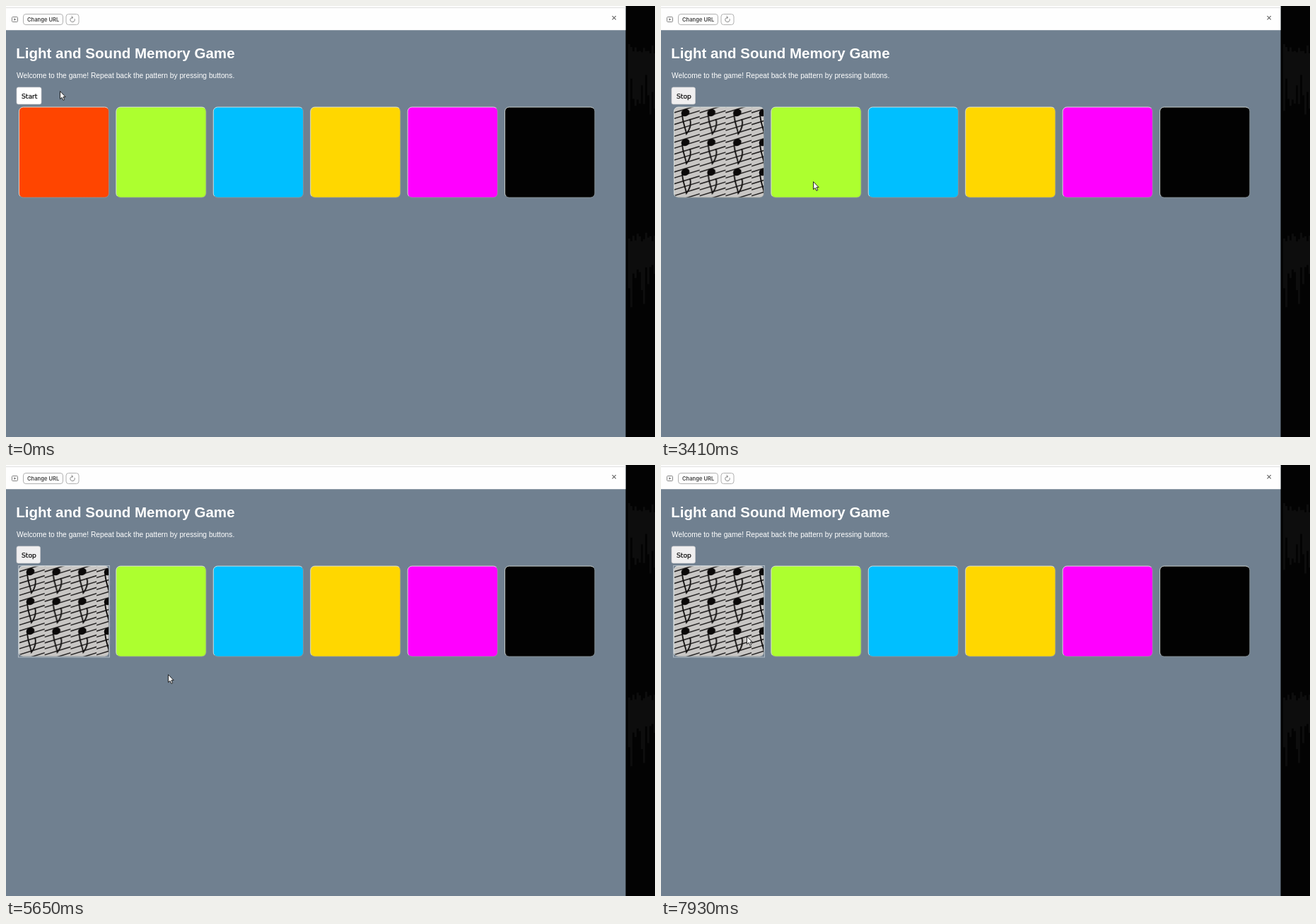
Recreate the animation shown at these times as an HTML page. Size 918 px wide and 610 px high, loop 8 s.

```html
<!DOCTYPE html>
<html lang="en">
<head>
<meta charset="utf-8">
<title>Memory game</title>
<style>
html, body { margin: 0; width: 100%; height: 100%; overflow: hidden; background: #708090; }
svg { display: block; width: 918px; height: 610px; }
.page { font-family: "Liberation Sans", Arial, sans-serif; fill: #fff; }
.button { font: 9.2px "DejaVu Sans", sans-serif; fill: #111; stroke: #111; stroke-width: .25; }
.bar { font: 600 7.6px Inter, sans-serif; fill: #444; }
.icon { fill: none; stroke: #777; stroke-width: .9; }
</style>
</head>
<body>
<svg viewBox="0 0 918 610">
  <defs>
    <linearGradient id="bevel" x2="1" y2="1">
      <stop offset=".5" stop-color="#dde3e0"/>
      <stop offset=".5" stop-color="#8a9499"/>
    </linearGradient>
    <pattern id="notes" x="18" y="143" width="36.7" height="42" patternUnits="userSpaceOnUse">
      <rect width="37" height="42" fill="#c8c6c4"/>
      <g id="staff" stroke="#242222" stroke-width="1.5"></g>
      <path d="M12 9C12 20 16 28 18 38C24 30 25 24 23 17" fill="none" stroke="#0b0909" stroke-width="1.8"/>
      <ellipse cx="16.5" cy="8" rx="6" ry="5" transform="rotate(-25 16.5 8)" fill="#0b0909"/>
    </pattern>
  </defs>
  <rect width="918" height="610" fill="#030303"/>
  <g id="texture"></g>
  <rect width="876.5" height="610" fill="#708090"/>
  <rect width="876.5" height="34.2" fill="#fefefe"/>
  <path d="M0 2.3H876.5" stroke="#ddd"/>

  <g class="icon">
    <rect x="8.5" y="15.5" width="8" height="7" rx="1"/>
    <path d="M11.3 17.2L14.4 19L11.3 20.8Z" fill="#777" stroke="none"/>
    <rect x="24.5" y="11.5" width="56" height="15" rx="3.5" stroke="#aaa"/>
    <rect x="85" y="11.5" width="18" height="15" rx="3.5" stroke="#aaa"/>
    <path d="M97 18.2A3.2 3.2 0 1 1 94 16.2M92.5 14.3L94.8 16.2L92.7 18"/>
    <path d="M857.5 14.2L862.7 19.4M862.7 14.2L857.5 19.4" stroke="#666" stroke-width="1.2"/>
  </g>
  <text class="bar" x="30" y="22">Change URL</text>

  <g class="page">
    <text x="14.2" y="74" font-size="20.55" font-weight="bold">Light and Sound Memory Game</text>
    <text x="15" y="102" font-size="10.22">Welcome to the game! Repeat back the pattern by pressing buttons.</text>
  </g>
  <rect id="box" x="15" y="115" height="24" rx="2.5" stroke="#c9c9cc" stroke-width=".7"/>
  <text class="button" id="label" x="22" y="130.6"></text>

  <g id="tiles" stroke="url(#bevel)" stroke-width=".9"></g>
  <rect id="focus" x="17.5" y="142.5" width="129" height="129.5" fill="none" stroke="#dde2e6" stroke-opacity=".6"/>
  <path id="cursor" d="M.5 .7V11.7L3 9.4L4.9 13.4L6.7 12.6L4.9 8.7H8.2Z" fill="#fff" stroke="#111" stroke-width=".9"/>
</svg>
<script>
const $ = id => document.getElementById(id);
const LOOP = 8000, STEP = 140.6;
const colors = ['#ff4500', '#adff2f', '#00bfff', '#ffd700', '#ff00ff', '#020202'];

function add(parent, tag, attrs) {
  const node = document.createElementNS('http://www.w3.org/2000/svg', tag);
  for (const key in attrs) node.setAttribute(key, attrs[key]);
  return parent.appendChild(node);
}

const tiles = colors.map((fill, i) => add($('tiles'), 'rect', {
  x: 18.4 + i * 137.45, y: 143.1, width: 127.2, height: 128, rx: 6, fill
}));

for (let i = 0; i < 7; i++) {
  add($('staff'), 'path', { d: `M-1 ${i * 8.4}l39 -12` });
}

// Faint ragged streaks on the dark strip at the right
let seed = 7;
const random = () => (seed = seed * 16807 % 2147483647) / 2147483647;
for (const top of [54, 320]) {
  for (let x = 880; x < 918; x += 3) {
    add($('texture'), 'rect', {
      x, y: top + random() * 14, width: 3, height: 30 + 70 * random(), fill: '#0d0d0d'
    });
  }
}

const moves = [
  { from: 0, to: 1, x: 85, y: 120 },
  { from: 4, to: 9, x: 34, y: 125 },
  { from: 14, to: 16, x: 344, y: 168 },
  { from: 21, to: 24, x: 215, y: 248 },
  { from: 24, to: 28, x: 108, y: 234 },
  { from: 33, to: 35, x: 229, y: 296 },
  { from: 41, to: 45, x: 223, y: 288 },
  { from: 49, to: 52, x: 201, y: 286 },
  { from: 52, to: 56, x: 121, y: 242 }
];

function pointer(t) {
  const step = Math.floor(t / STEP);
  let x = 76, y = 120;
  for (const m of moves) {
    const k = Math.min(1, Math.max(0, (step - m.from) / (m.to - m.from)));
    x += (m.x - x) * k;
    y += (m.y - y) * k;
  }
  return `translate(${Math.round(x)} ${Math.round(y)})`;
}

const lights = [
  { tile: 0, on: 2690, off: 3530 },
  { tile: 0, on: 4250, off: 4690 },
  { tile: 0, on: 5650, off: 6360 },
  { tile: 2, on: 6650, off: 7220 },
  { tile: 0, on: 7930, off: LOOP }
];

function draw(t) {
  $('cursor').setAttribute('transform', pointer(t));

  const playing = t >= 1790;
  $('label').textContent = playing ? 'Stop' : 'Start';
  $('box').setAttribute('width', playing ? 33.5 : 35);
  $('box').setAttribute('fill', t >= 1650 ? '#f0eff0' : '#fff');
  $('focus').style.display = t >= 4250 ? '' : 'none';

  tiles.forEach((tile, i) => {
    const lit = lights.some(l => l.tile === i && t >= l.on && t < l.off);
    tile.setAttribute('fill', lit ? 'url(#notes)' : colors[i]);
  });
}

const start = performance.now();
function tick() {
  draw((performance.now() - start) % LOOP);
  requestAnimationFrame(tick);
}
tick();
</script>
</body>
</html>
```
